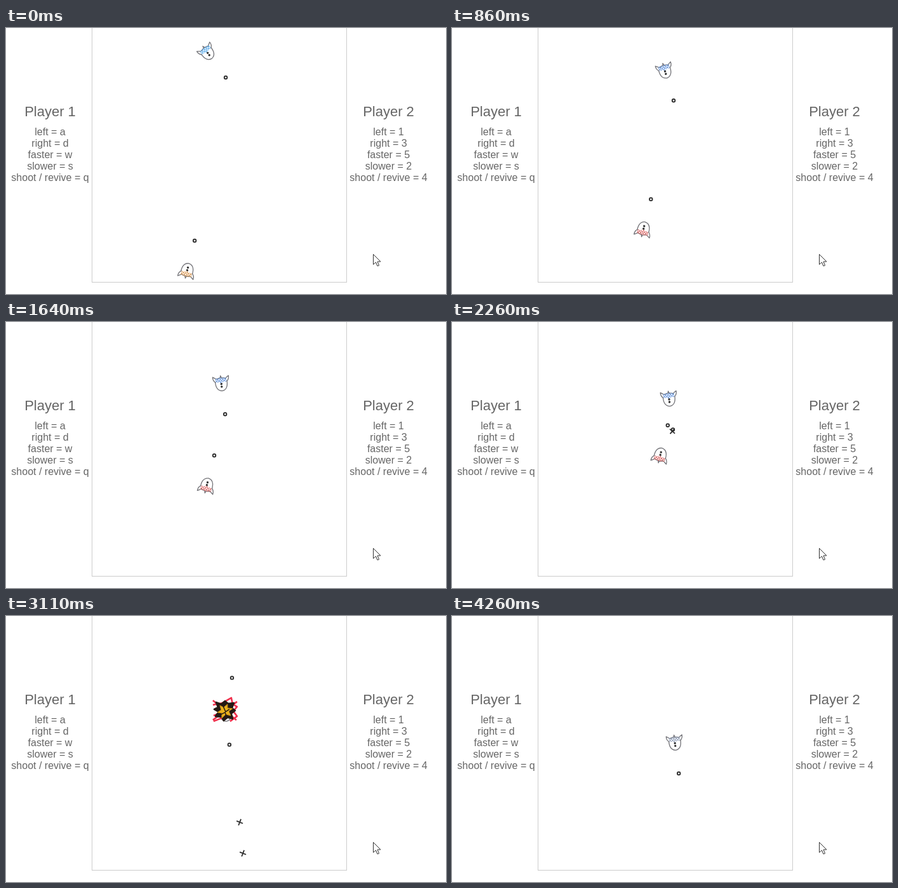
An HTML page that plays this animation: 693 by 419 pixels, repeating every 4340 ms.

```html
<!DOCTYPE html>
<html lang="en">
<head>
<meta charset="utf-8">
<title>Two player duel</title>
<style>
  html, body { margin: 0; width: 100%; height: 100%; overflow: hidden; background: #fff; }
  svg { display: block; }
  text { font: 16px "Liberation Sans", Arial, sans-serif; fill: #666; text-anchor: middle; }
  text.title { font-size: 22px; }
  .ink { fill: none; stroke: #2c2c2c; stroke-width: 1.8; }
  .pencil { fill: #fff; stroke: #737378; stroke-width: 1.3; stroke-linejoin: round; }
</style>
</head>
<body>
<svg width="693" height="419" viewBox="0 0 693 419">
  <defs>
    <pattern id="blueCheck" width="4" height="4" patternUnits="userSpaceOnUse">
      <path id="blueInk" d="M0 0h2v2h-2zM2 2h2v2h-2z"/>
    </pattern>
    <pattern id="redCheck" width="4" height="4" patternUnits="userSpaceOnUse">
      <path id="redInk" d="M0 0h2v2h-2zM2 2h2v2h-2z"/>
    </pattern>
    <g id="hull">
      <path class="pencil" d="M-9 -6C-10 3 -9 12 0 13C9 12 10 3 9 -6L0 -8Z"/>
      <path class="pencil" d="M-8 -7L-12.5 -10Q-13 -4 -8.5 -1M8 -7L12.5 -10Q13 -4 8.5 -1M-1 -7L0 -11L1.5 -7"/>
      <circle cy="2" r="1.7" fill="#333"/>
      <circle cy="6.3" r="1.7" fill="#333"/>
    </g>
    <path id="hat" d="M-9 -7L0 -8L9 -7L8.5 -1L3 -1L0 1L-3 -1L-8.5 -1Z"/>
    <path id="cross" class="ink" d="M-4 -3.5L4 3.5M3.5 -4L-3.5 4"/>
    <circle id="ring" class="ink" r="2.3"/>
  </defs>

  <rect x="135.5" y="-2.5" width="401" height="403" fill="none" stroke="#ccc"/>
  <g id="labels"></g>

  <g id="blueShip"><use href="#hull"/><use href="#hat" fill="url(#blueCheck)"/></g>
  <g id="redShip"><use href="#hull"/><use href="#hat" fill="url(#redCheck)"/></g>
  <g id="blast" fill="none" stroke-linejoin="round">
    <path stroke="#f0304c" stroke-width="2.6" d="M-19 -16L18 15M-19 15L19 -14M-19 -9L-4 -12L10 -20L12 -10L19 -6L13 1L19 9L8 17M-18 8L-8 4M-18 17L-3 11"/>
    <path fill="#241a14" stroke="#241a14" stroke-width="2.5" d="M-14 -13L-6 -10L0 -15L5 -11L14 -12L11 -4L16 0L10 5L12 13L4 11L-2 16L-5 10L-15 9L-10 2L-17 -2L-11 -5Z"/>
    <path fill="#e9b21c" stroke="#c98a18" d="M-8 -8L-2 -5L4 -10L4 -4L12 -3L6 1L9 8L1 6L-5 12L-5 4L-12 3L-6 -1Z"/>
    <path stroke="#241a14" stroke-width="1.4" d="M-3 -7L1 2L7 -2M-6 6L0 3L3 10"/>
  </g>
  <use id="blueAim" href="#ring"/>
  <use id="redAim" href="#ring"/>
  <use id="shot0" href="#cross"/>
  <use id="shot1" href="#cross"/>
  <use id="shot2" href="#cross"/>
  <use id="redShot" href="#cross"/>

  <path transform="translate(578.5 356.5)" fill="#fff" stroke="#333" d="M0 0V16L4 12.5L6.5 18.5L9 17.5L6.5 11.5H11.5Z"/>
</svg>
<script>
const LOOP = 4340, STEPS = 56, AIM = 50;
const el = id => document.getElementById(id);

function addLabels(x, title, keys) {
  const actions = ['left', 'right', 'faster', 'slower', 'shoot / revive'];
  const lines = actions.map((a, i) =>
    `<text x="${x}" y="${169 + 18 * i}">${a} = ${keys[i]}</text>`);
  el('labels').innerHTML += `<text class="title" x="${x}" y="139">${title}</text>` + lines.join('');
}
addLabels(69.5, 'Player 1', 'adwsq');
addLabels(602.5, 'Player 2', '13524');

// step, x, y, heading in degrees
const bluePath = [
  [0, 316.5, 37.6, 53.8], [8, 331, 56.8, 53.8], [11, 335, 66.3, 73.7],
  [13, 336.2, 71.4, 83], [55, 350.9, 198.4, 82.8]
];
// x and y at step 36, first and last visible step
const blueShots = [[370, 352, 29, 37], [360, 271, 33, 40], [355, 222, 35, 41]];

function along(path, n) {
  let i = 1;
  while (i < path.length - 1 && path[i][0] < n) i++;
  const a = path[i - 1], b = path[i], k = (n - a[0]) / (b[0] - a[0]);
  return [1, 2, 3].map(j => a[j] + (b[j] - a[j]) * k);
}

function place(id, visible, x, y, turn = 0) {
  el(id).setAttribute('visibility', visible ? 'visible' : 'hidden');
  el(id).setAttribute('transform', `translate(${x} ${y}) rotate(${turn})`);
}

function placeShip(name, alive, aiming, [x, y, heading]) {
  const a = heading * Math.PI / 180;
  place(name + 'Ship', alive, x, y, heading - 90);
  place(name + 'Aim', aiming, x + AIM * Math.cos(a), y + AIM * Math.sin(a));
}

function draw(ms) {
  const n = Math.floor((ms + 4) / LOOP * STEPS) % STEPS;
  const exploding = n >= 34 && n <= 42;

  placeShip('blue', true, true, along(bluePath, n));
  const rx = 285 + 1.472 * n, ry = 383.5 - 5.94 * n;
  placeShip('red', n < 34, n <= 42, [rx, ry, -76]);
  place('blast', exploding, rx + 1, ry + 3);

  blueShots.forEach(([x, y, first, last], i) => {
    const k = n - 36;
    place('shot' + i, n >= first && n <= last, x + 3.28 * k, y + 25.7 * k, n < 30 ? 0 : -20);
  });
  const k = n - 45;
  place('redShot', n >= 42 && n <= 45, 380 + 7 * k, 15 - 24.4 * k);

  el('blueInk').setAttribute('fill', n === 0 ? '#4ba3ea' : exploding || n > 50 ? '#8796b2' : '#5c8fdc');
  el('redInk').setAttribute('fill', n === 0 ? '#d9944c' : '#d9605f');
}

function tick() {
  draw(performance.now() % LOOP);
  requestAnimationFrame(tick);
}
tick();
</script>
</body>
</html>
```
